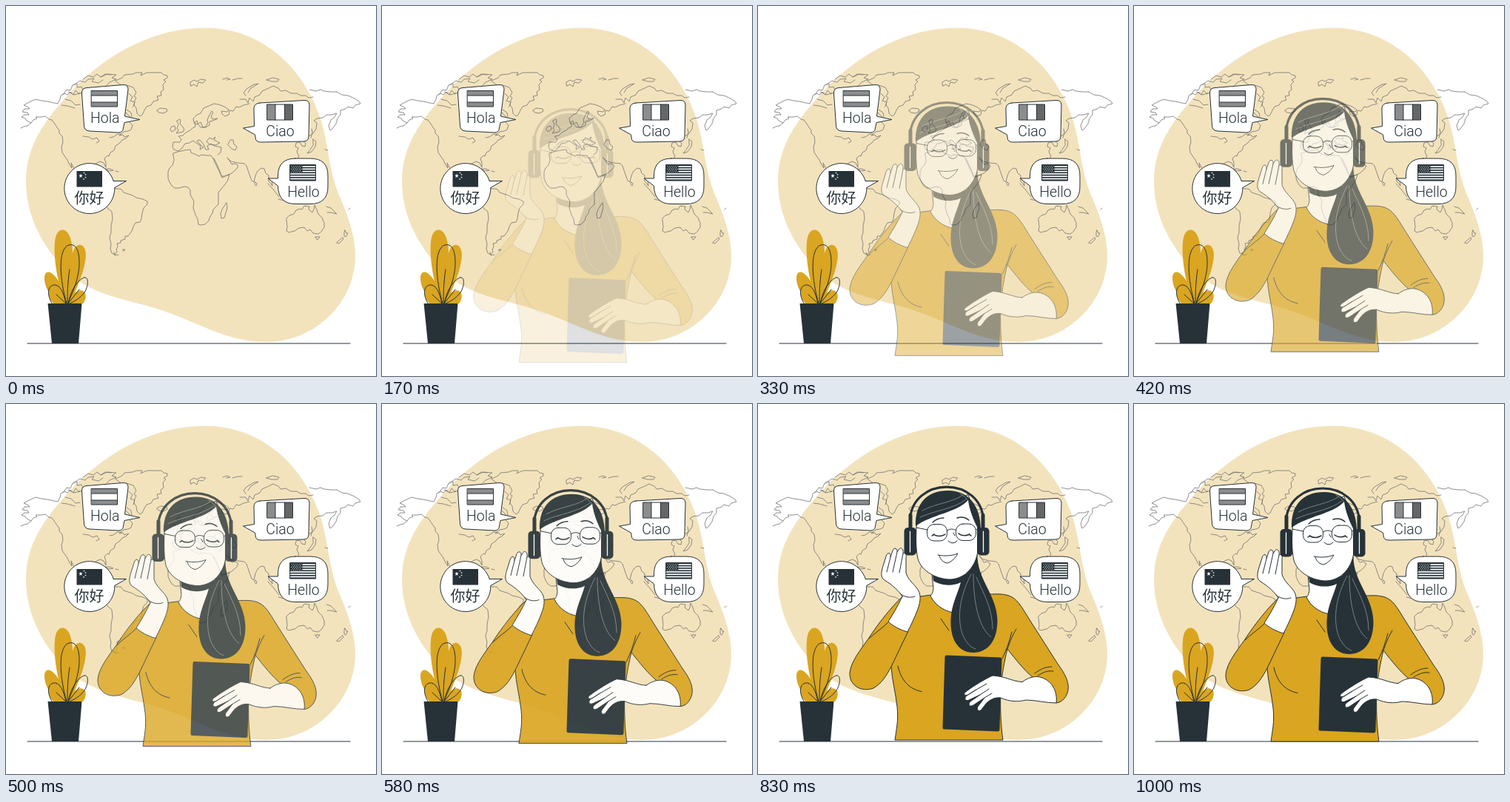
An HTML page for the animation above (1040 ms loop, 500 px wide and 500 px high).

```html
<!DOCTYPE html>
<html lang="en">
<head>
<meta charset="utf-8">
<title>Languages of the world</title>
<style>
html, body { margin: 0; width: 100%; height: 100%; overflow: hidden; background: #fff; }
svg { display: block; width: 100%; height: 100%; }
path, rect, circle, line { stroke-linecap: round; stroke-linejoin: round; }
.ink { fill: #263238; }
.gold { fill: #daa520; }
.line { fill: none; stroke: #263238; stroke-width: 1; }
.edge { stroke: #263238; stroke-width: 1; }
.skin { fill: #fff; stroke: #263238; stroke-width: 1; }
.strand { fill: none; stroke: #8e9496; stroke-width: .8; }
.map { fill: none; stroke: #737373; stroke-width: .8; }
.bubble { fill: #fff; stroke: #263238; stroke-width: 1; }
text { font: 300 19.5px Roboto, Inter, sans-serif; fill: #263238; text-anchor: middle; }
text.cjk { font: 300 20px "Noto Sans CJK SC", "Noto Sans CJK", "Noto Sans CJK JP", sans-serif; }
</style>
</head>
<body>
<svg viewBox="0 0 500 500">
  <path fill="#f3e3bc" d="M270 29.5C335 30 385 70 410 118C440 172 430 212 453 262C464 290 472 312 472 338C472 400 418 454 352 454C292 454 256 423 190 405C148 394 113 386 86 362C50 328 27 284 27 237C27 182 60 146 96 107C140 64 200 29.5 270 29.5Z"/>

  <g class="map">
    <!-- North America -->
    <path d="M20 165l4-2 5-1 5-4-6-3-2-3-5-2 4-3 6 0-2-3-7-1 3-4 7 0-3-3-5-2 7-4 9-4 8 2 8 1 9 2 5 1 3-6 1-5 5-3 4 2 4-4 4 4 3-6 4 4 3 0 4-4"/>
    <path d="M34 158l3-4 5-2-2-2 8 0 5-1 5 4 4 1 3 4 4 6 3 4 0 4 4 4 1 8-2 6 1 8 4 6 3 4 2 5 4 6-1-7 3 6 5 5 7 2 6-4"/>
    <path d="M118 222l3-9 6-3 5 2 3 6 0-6-2-6 4-4 2 1 2-5 5-3 2-6 6-4 3-4 5-2 4-4-6 2-2-3-5 1 6-5 6-1 4-2 2-6-4-4 0-8-5-5"/>
    <path d="M104 176l8 1 5 3 6-2 3 5-4 2M140 178l5-1 6-4 4 0M134 220l6 0 5 2-6 1-5-3M148 223l4 1"/>
    <path d="M77 120l5-7 5 1 3-7 6-2 0 5 6-1 3 6M84 116l8 4 8-2M91 107l9-6 7 2 4-4 8-1-3 4 9 2 6-4M104 99l7-5 7 2 5-4 5 4 6-4 8 1M80 126l8 2 6 6 6-1M75 134l8 1 10 3M128 96l9-4 12 1-6 4 6 2-9 4-4 4"/>
    <path d="M166 118l5 5-3 5 6 2-2 6M163 140l6 4 1 6"/>
    <!-- Greenland and Iceland -->
    <path d="M148 101l9-4 3-4 11-1 5-2 8 0-2 4 8-4 11 0 9 0 3 3 5 1 0 3-5 3 3 2-4 4 1 7-4 3 1 5-6 1 2 5-7 2-3 5-6 2-3 5-3 6-3 2-4-4-1-7-3-4 1-6 2-4-3-2 3-5-4-7-9-3-6 1-4-3z"/>
    <path d="M205 140l4-2 8 1 1 3-5 3-6-1-3-2z"/>
    <!-- South America -->
    <path d="M135 240l8 0 5 7 7 0 4 5 6 2 6 2 5 3 9 2 6 3 0 4-5 5-2 7-1 8-2 4-6 1-3 5-2 6-5 7-4 0 0 4-6 2 0 3-5 1 1 4-2 4 1 3-3 4-4-2-2-6 1-6-2-9 2-7 0-9 2-9-1-10-6-5-3-6"/>
    <path d="M146 333l1 4 5-1M158 329l3 0-2 2z"/>
    <!-- Africa -->
    <path d="M226 199l6-2 9-2 8-1 1 4 7 3 4 2 3-2 7 1 6 0 3 4 2 5 3 6 3 6 3 7 4 0 7-2-3 9-7 9-5 6 0 8 0 8-7 7-1 5-3 4-2 6-5 5-6 1-3-1-1-7-3-6-3-9 1-9-5-9 0-6-3-4-5-1-7 2-6 0-4-3-3-5-2-5 0-9 2-5 4-4 2-6z"/>
    <path d="M298 266l1 7-4 13-4 1-1-6 2-6z"/>
    <!-- Europe -->
    <path d="M227 194l-2-3 1-7 9 0 2-4-4-4 6-1 4-4 6-3 3-3 4-2-1-6 3-2 1 4 4 5 7 0 5-3 0-5 5-1 6-3-7 1-2-4 3-5-2-2-4 7-2 5 1 3-3 6-4 1-3-7-5 3-4-2-1-6 5-5 5-2 4-7 7-3 7-3 6 1 8 3 6 4-2 3-8-1 1 4 4 3 5-2 1-6 5 1 4-6 4 1 6-3 8-2"/>
    <path d="M227 194l6 2 5-4 4-6 6-1 5-3 4 3 6 4-1 5 5-3-5-4-4-5 4-1 5 6 3 7 4 0-2-5 5-3 4 3 6 1 4 1-1 7-4 3M271 183l4-5 4 2 4-3-2 4 8 4-6 3-7-1z"/>
    <path d="M231 155l4-2 1 2-1 4 3 3 3 5-2 3-9 2 3-4-2-3 2-4zM224 163l4-1 1 5-5 3-2-3z"/>
    <path d="M249 103l5-3 4 2 5-3 7 1-4 4-6-1-2 6-4-3-4 2zM293 99l6-2 4 2-5 1M306 100l7-2 6 0M324 121l-3-4 4-5 10-6 6-1-10 6-4 6M352 100l7 2 8 0 2-3-8-2z"/>
    <!-- Asia -->
    <path d="M316 126l8 0 3 5 2-7 5 5 2-6 7-3 3-5 9-4 6-3 7 3 3 4 7-1 7 4 8 0 5 3 7 0 4 3 6-1"/>
    <path d="M410 113l9 2 6-2 5 2 9 1 8 0 7 4 8 1 9 4 6 4 2 3-7 2-3 4-7-2-3 3-7 2 0 6-4 5-2 7-5 7-3 2-2-6 3-8 5-4 3-5-7 2-7 0-5 4-8 1-4 3 4 3-1 8-4 6-4 3-7 2-3 4 4 5-1 4-4-1-3-5-5 1-1 5 4 2-2 5 3 6-5 8-7 4"/>
    <path d="M413 166l1 5-2 7M415 180l4 3-1 7-5 7-6 2 4-5 4-6zM431 194l4 1M463 275l2-2M433 271l6 2 8 8-8-2-5 0"/>
    <path d="M281 206l3 6 4 9 4 11 6-3 7-3 6-5 3-5-4-3-5 1-3-5-3-4M299 205l5 5 9 2 9 1 3 3 3 9 4 11 3 2 2-9 3-6 5-4 4 1 2 6 4 3 0 8 5 6-1-7 5 2M300 187l3-6 4 0 1 6 4 3-2 5-5-2zM337 238l2 2-1 3-2-2zM354 240l8 9 7 9M368 261l12 3"/>
    <!-- Oceania -->
    <path d="M379 287l4-4 6-2 3-5 5-2 3 1 3-5 7 1-1 4 5 4 2-4 1-6 3 6 2 6 5 5 3 7 0 6-4 6-4 3-7-1-4-5-4 2-4-5-7 1-6 4-8 2-3-2 1-5z"/>
    <path d="M418 312l6 0-3 4zM458 303l2 4 2 0-3 5-2-1 0-5zM455 313l1 2-6 6-3-1z"/>
  </g>

  <path class="line" d="M29 456H465"/>

  <!-- plant -->
  <g class="gold">
    <path d="M80 402C69 372 64 340 66 319C67 306 73 301 79 303C87 306 90 322 90 334C92 327 96 322 101 323C108 325 109 335 107 345C104 364 95 380 88 402Z"/>
    <path d="M80 402C64 400 51 382 52 366C53 358 59 358 64 363C74 372 78 386 80 402Z"/>
    <path d="M64 402C57 395 55 385 62 380C72 377 79 392 82 402Z"/>
    <path d="M84 402C89 389 98 382 104 385C110 388 108 397 104 402Z"/>
  </g>
  <path class="line" d="M82 402C73 372 69 328 85 323C100 319 101 347 97 364C94 380 88 390 84 402M86 356C83 375 83 390 83 402M62 402C54 388 57 376 67 377C76 379 79 394 81 402M68 390L81 402M84 402C87 386 95 372 105 367C113 365 111 380 106 387C100 395 93 399 86 402M99 383L84 402"/>
  <path class="ink" d="M56.5 402H102.500L98 456H62Z"/>

  <!-- bubbles -->
  <path class="bubble" d="M109 110.500L158 106.500Q165.500 106 165 113L160.500 149L181 153.500L160 157.500L158.500 165Q158 171 152 171L113 169Q106 168.500 105.500 162L102.500 118Q102 111 109 110.500Z"/>
  <rect x="115.500" y="114.500" width="35" height="21.500" fill="#8c8c8c"/>
  <rect x="115.500" y="121" width="35" height="9" fill="#fff"/>
  <path class="line" d="M115.500 114.500h35v21.500h-35zM115.500 121h35M115.500 130h35"/>
  <text x="133.700" y="158">Hola</text>

  <path class="bubble" d="M343 131L403 127.500Q410 127 410 134L409 176Q409 183 402 183L345 184Q337 184.500 337 177L336.500 174L320.500 165L335.500 162.500L335 138Q335.500 131.500 343 131Z"/>
  <rect x="353" y="133" width="11" height="21" fill="#8c8c8c"/>
  <rect x="376.500" y="133" width="11" height="21" fill="#666"/>
  <path class="line" d="M353 133h34.500v21h-34.500zM364 133v21M376.500 133v21"/>
  <text x="370.500" y="176.300">Ciao</text>

  <path class="bubble" d="M391 206H411Q435 206 435 229V244Q435 267.500 411 267.500H391Q368 267.500 367.500 243L354 233L367.500 233V229Q368 206 391 206Z"/>
  <rect x="384" y="214.500" width="34.500" height="21.500" fill="#fff"/>
  <g id="stripes" class="ink"></g>
  <rect x="384" y="214.500" width="16.500" height="11.500" class="ink"/>
  <g id="dots" fill="#fff"></g>
  <rect x="384" y="214.500" width="34.500" height="21.500" class="line"/>
  <text x="402" y="257.500">Hello</text>

  <path class="bubble" d="M145.300 236.500L162.500 236.500L146.800 245.500A34 34 0 1 1 145.300 236.500Z"/>
  <rect x="95.500" y="223" width="34.500" height="21.500" class="ink"/>
  <g id="stars" fill="#fff"></g>
  <text class="cjk" x="112.500" y="267">你好</text>

  <!-- woman -->
  <g id="woman" opacity="0">
    <path class="gold edge" d="M234 260L219 262L197 261C183 272 160 302 150 318C137 336 126 350 124 365C123 382 139 392 156 386C168 379 174 368 180 357C181 374 186 392 188 411C190 430 187 441 185 456H331C328 436 327 410 328 385C330 365 333 350 337 333C348 347 360 362 371 371L388 388L403 406C414 405 421 392 419 381C417 368 408 358 403 350L366 292C355 274 350 265 339 261C330 258 322 259 314 259Z"/>
    <path class="line" d="M189 356C193 374 203 387 221 390.500M349 306C343 316 340 325 337 333M343 310C340 322 336 334 330 346M374 366C382 360 389 357 397 357M378 369C386 364 392 362 399 363M247 292L258 308"/>
    <path class="skin" d="M235 232L237 251C236 258 235 259 233 261C238 272 249 281 264 284L292 235Z"/>
    <path class="ink" d="M255 344L327 347L324 442L252 439Z" stroke="#263238" stroke-width="5"/>
    <path class="skin" d="M357 377.500C363 373 372 369 381 371C397 375 405 390 403 406C389 406 375 402 362 402C351 405 339 404 328 399C319 398 313 402 308 407L302 415C299 418 295 416 297 411L306 399L291 409C286 412 283 408 287 404L300 395L285 402C280 404 278 400 282 396L295 388L284 395C278 397 277 393 282 390C293 382 306 374 317 369C335 370 344 377 357 377.500Z"/>
    <path class="line" d="M295 388L309 380M300 395L312 387M306 399L316 393"/>
    <path class="gold" d="M177 296L203 309L180 357L150 345Z"/>
    <path class="line" d="M177 296C168 305 157 312 150 319M203 309L180 357"/>
    <path class="skin" d="M195 262C190 254 181 246 171 240C165 236 167 229 168 224L173 208C175 201 180 203 179 209L182 200C184 195 189 197 188 202L190 199C193 194 197 198 196 204C199 202 201 205 200 210V230C202 238 209 244 214 250C221 258 220 268 216 279C212 290 207 300 202 310C192 307 182 302 176 296C183 285 189 275 195 262Z"/>
    <path class="line" d="M179 209L174 229M188 202L182 229M196 204L191 230M192 258C196 262 205 265 212 262"/>

    <!-- hair and face -->
    <path class="ink" d="M236 233C249 239 270 239 282 231L290 200L296.500 205C296 240 322 258 323.500 293C324 320 312 338 290 338C267 337 258 314 261 287C263 270 270 258 274 243C262 249 246 247 237 241Z"/>
    <path class="strand" d="M288 232C275 257 267 288 277 315C282 325 287 331 294 333M291 232C291 262 296 303 315 317M295 236C304 257 317 277 317 306"/>
    <path class="skin" d="M215 158C213 177 213 198 216 211C221 229 243 239 260 239C281 238 295 220 297 200V160L284 125Z"/>
    <path class="ink" d="M213 167C212 137 228 119 257 119C285 119 301 140 301 172V204L296.500 204C297 190 297 178 296 168C291 158 286 146 284 132C268 149 235 151 213 167Z"/>
    <path class="strand" d="M219 155C238 146 264 144 281 131M222 146C240 136 261 136 277 125M284 133C282 129 278 126 273 123"/>
    <path class="line" d="M236 162Q242 156 251 156M269 156Q278 153 285 159" style="stroke-width:1.400"/>
    <g class="line">
      <rect x="228.500" y="164.500" width="27" height="22.500" rx="9.500"/>
      <rect x="267.500" y="164" width="27" height="22.500" rx="9.500"/>
      <path d="M255.500 173Q261 169 267.500 172.500M229 172L214 169M294.500 172L298 171"/>
      <path d="M257 187Q263 193 269 187M264 176L266 180"/>
      <path d="M237 178Q245 183 253 178M271 177Q278 182 286 178M238 178L235 180M285 178L288 180" stroke-width="1.500"/>
      <path d="M243 206C253 208 263 207 270 204C267 210 262 215 256 217C250 216 246 212 245 206.500"/>
    </g>

    <!-- headphones -->
    <path class="line" d="M205.500 171V158C207 131 229 114 255 114C281 114 303 131 304.500 158V171" style="stroke-width:3.200"/>
    <path class="line" d="M206 152V172M304 152V172" style="stroke-width:5"/>
    <rect x="197.500" y="169" width="16.500" height="37.500" rx="5" class="ink"/>
    <rect x="296" y="169" width="16.500" height="37.500" rx="5" class="ink"/>
    <path d="M205.500 174V202M304.500 174V202" stroke="#fff" stroke-width="1.300"/>
  </g>
</svg>
<script>
const $ = id => document.getElementById(id);

function add(parent, tag, attrs) {
  const el = document.createElementNS('http://www.w3.org/2000/svg', tag);
  for (const k in attrs) el.setAttribute(k, attrs[k]);
  $(parent).append(el);
}

function star(x, y, r) {
  const pts = [];
  for (let i = 0; i < 10; i++) {
    const a = i * Math.PI / 5 - Math.PI / 2, d = i % 2 ? r * 0.4 : r;
    pts.push((x + d * Math.cos(a)).toFixed(2) + ',' + (y + d * Math.sin(a)).toFixed(2));
  }
  add('stars', 'polygon', { points: pts.join(' ') });
}

const band = 21.5 / 13;
for (let i = 0; i < 13; i += 2)
  add('stripes', 'rect', { x: 384, y: 214.5 + i * band, width: 34.5, height: band });
for (let r = 0; r < 5; r++)
  for (let c = 0; c < 6 - r % 2; c++)
    add('dots', 'circle', { cx: 385.8 + c * 2.6 + r % 2 * 1.3, cy: 216.2 + r * 2.1, r: 0.55 });
star(101, 229.5, 3);
[[105.5, 225.5], [107.5, 228], [107.5, 231.5], [105, 234]].forEach(p => star(...p, 1.3));

// cubic-bezier(.36, -.01, .5, 1.38)
const curve = (t, a, b) => 3 * (1 - t) * t * ((1 - t) * a + t * b) + t * t * t;
function ease(x) {
  if (x >= 1) return 1;
  let lo = 0, hi = 1;
  for (let i = 0; i < 30; i++) {
    const mid = (lo + hi) / 2;
    if (curve(mid, 0.36, 0.5) < x) lo = mid; else hi = mid;
  }
  return curve(lo, -0.01, 1.38);
}

const LOOP = 1040, FPS = 24, RISE = 30;
const woman = $('woman');
const start = performance.now();

function draw() {
  const t = (performance.now() - start) % LOOP;
  const step = Math.min(24, Math.floor((t + 5) * FPS / 1000));
  const p = step < 2 ? 0 : ease((step + 1) / 25);
  woman.setAttribute('opacity', Math.max(0, Math.min(1, p)));
  woman.setAttribute('transform', `translate(0 ${(RISE * (1 - p)).toFixed(3)})`);
  requestAnimationFrame(draw);
}
draw();
</script>
</body>
</html>
```
